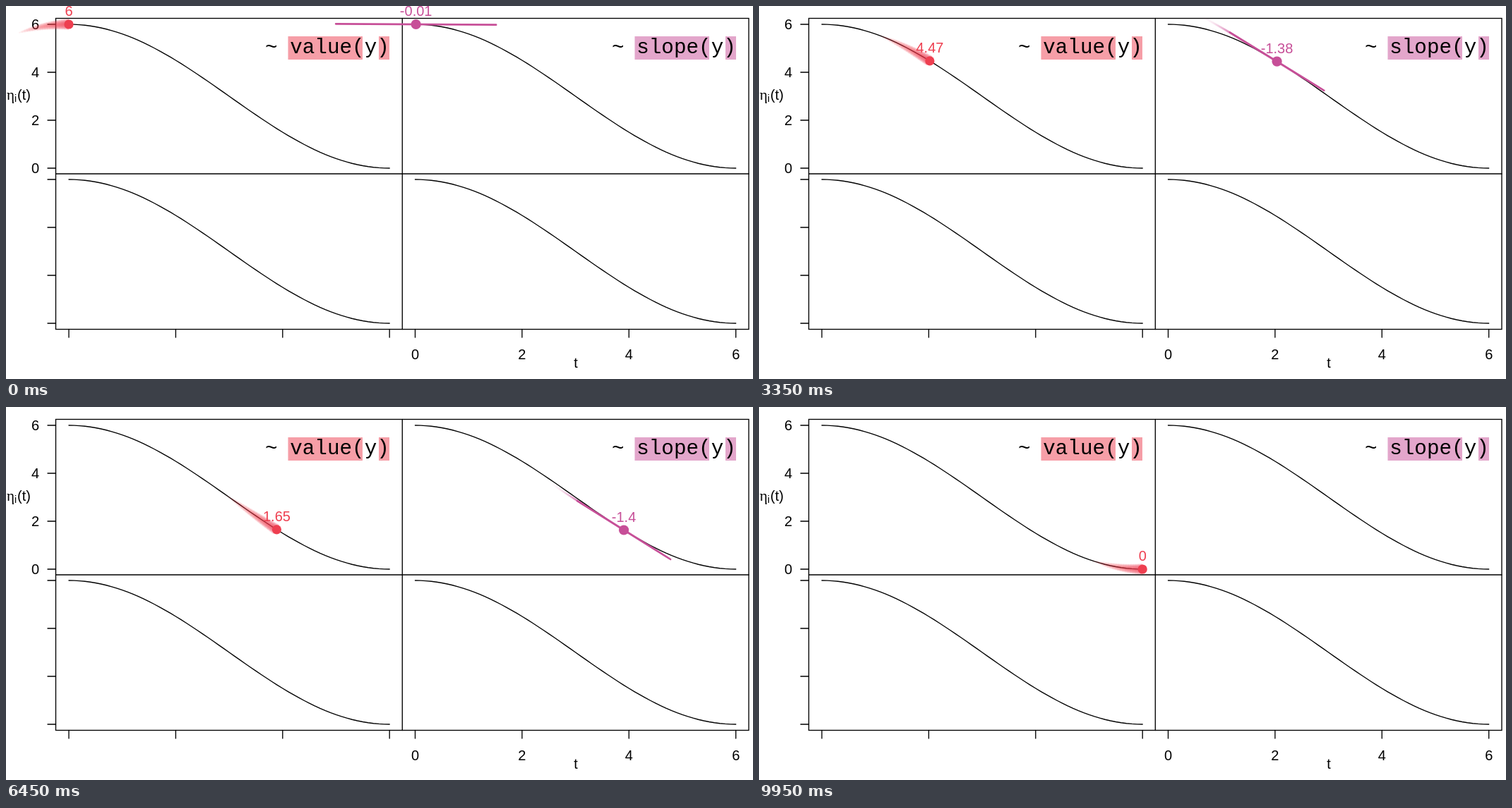
Write an HTML page with a canvas that moves like this. It is 1058 px wide and 529 px high and loops after 10000 ms.

```html
<!DOCTYPE html>
<html>
<head>
<meta charset="utf-8">
<style>
html, body { margin: 0; width: 100%; height: 100%; overflow: hidden; background: #fff; }
canvas { display: block; }
</style>
</head>
<body>
<canvas id="stage" width="1058" height="529"></canvas>
<script>
const ctx = document.getElementById('stage').getContext('2d');
const RED = '#ee3f50', PINK = '#c74f98';
const SANS = '"Liberation Sans", Arial, sans-serif';
const LEFT = 89, RIGHT = 579.5, TOP = 230, BOTTOM = 450;
const UX = 75.7, UY = 34;
const FRAMES = 200, STEP = 6 / (FRAMES - 1);

const value = x => 3 + 3 * Math.cos(Math.PI * x / 6);
const slope = x => -1.0005 * Math.PI / 2 * Math.sin(Math.PI * x / 6);
const short = v => String(+v.toFixed(2));

function line(x1, y1, x2, y2) {
  ctx.beginPath();
  ctx.moveTo(x1, y1);
  ctx.lineTo(x2, y2);
  ctx.stroke();
}

function curve(x0, y0, from, to) {
  ctx.beginPath();
  for (let k = 0; k <= 60; k++) {
    const x = from + (to - from) * k / 60;
    ctx.lineTo(x0 + x * UX, y0 - value(x) * UY);
  }
  ctx.stroke();
}

function text(s, x, y, align = 'center', color = '#000', font = '20px ' + SANS) {
  ctx.font = font;
  ctx.fillStyle = color;
  ctx.textAlign = align;
  ctx.fillText(s, x, y);
}

function title(name, right, color) {
  ctx.globalAlpha = 0.5;
  ctx.fillStyle = color;
  ctx.fillRect(right - 143.5, 43, 105.5, 33);
  ctx.fillRect(right - 15, 43, 15, 33);
  ctx.globalAlpha = 1;
  text(`~ ${name}(y)`, right - 176, 67, 'left', '#000', '29.3px "Liberation Mono", "Courier New", monospace');
}

function drawPlot() {
  ctx.strokeStyle = '#000';
  ctx.lineWidth = 1.35;
  ctx.lineCap = 'round';
  ctx.strokeRect(70.5, 17.5, 981.5, 441);
  line(561.3, 17.5, 561.3, 458.5);
  line(70.5, 238, 1052, 238);
  for (let v = 0; v <= 6; v += 2) {
    for (const y0 of [TOP, BOTTOM]) line(59, y0 - v * UY, 70.5, y0 - v * UY);
    for (const x0 of [LEFT, RIGHT]) line(x0 + v * UX, 458.5, x0 + v * UX, 470);
    text(v, 47, TOP + 7 - v * UY, 'right');
    text(v, RIGHT + v * UX, 501);
  }
  for (const x0 of [LEFT, RIGHT])
    for (const y0 of [TOP, BOTTOM]) curve(x0, y0, 0, 6);
  text('t', 807, 513);
  text('η', 1, 133, 'left', '#000', '21px "Liberation Serif", serif');
  text('i', 12, 136, 'left', '#000', '14px ' + SANS);
  text('(t)', 16, 133, 'left');
  title('value', 543, RED);
  title('slope', 1034, PINK);
}

function marker(x, y, r, label, color) {
  ctx.globalAlpha = 1;
  ctx.fillStyle = color;
  ctx.beginPath();
  ctx.arc(x, y, r, 0, 2 * Math.PI);
  ctx.fill();
  text(label, x, y - 11.7, 'center', color);
}

function drawValue(i) {
  const x = i * STEP;
  ctx.strokeStyle = RED;
  ctx.lineCap = 'butt';
  ctx.globalAlpha = 0.07;
  for (let k = 20; k > 0; k--) {
    ctx.lineWidth = 16 * Math.pow(1 - (k - 1) / 20, 0.7);
    curve(LEFT, TOP, x - k * 1.55 * STEP, x);
  }
  marker(LEFT + x * UX, TOP - value(x) * UY, 6.6, short(value(x)), RED);
}

function drawSlope(i) {
  const x = (i + 0.5) * STEP, s = slope(x);
  const dx = 1.5 / Math.hypot(1, s);
  ctx.strokeStyle = PINK;
  ctx.lineCap = 'round';
  ctx.lineWidth = 2.6;
  // The trail keeps the present angle and fades along the curve.
  for (let k = Math.min(20, i); k >= 0; k--) {
    const cx = x - k * STEP, px = RIGHT + cx * UX, py = TOP - value(cx) * UY;
    ctx.globalAlpha = k ? 0.15 * (1 - k / 21) ** 2 : 1;
    line(px - dx * UX, py + dx * s * UY, px + dx * UX, py - dx * s * UY);
  }
  marker(RIGHT + x * UX, TOP - value(x) * UY, 7.1, short(s), PINK);
}

function draw() {
  const i = Math.floor(performance.now() / 50) % FRAMES;
  ctx.globalAlpha = 1;
  ctx.fillStyle = '#fff';
  ctx.fillRect(0, 0, 1058, 529);
  drawPlot();
  drawValue(i);
  if (i < FRAMES - 1) drawSlope(i);
  requestAnimationFrame(draw);
}
draw();
</script>
</body>
</html>
```
